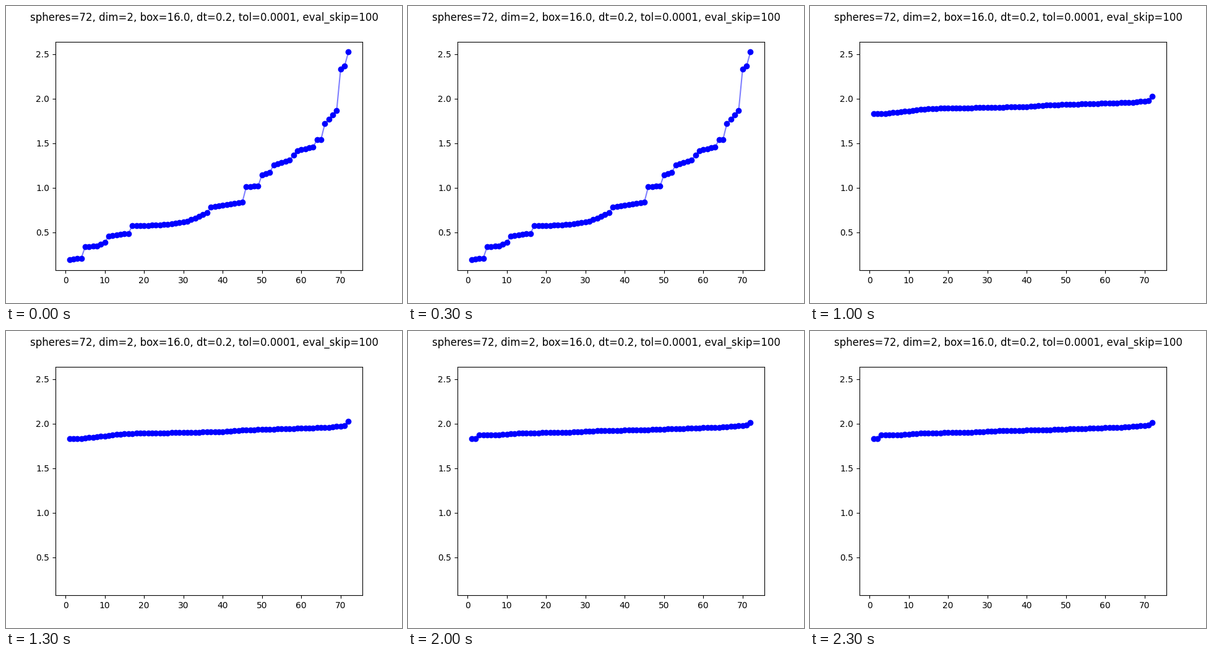
These frames come from a looping animation (640x480 px, 2.5 s). A matplotlib script:

```python
import numpy as np
import matplotlib.pyplot as plt
from matplotlib.animation import FuncAnimation

COUNT = 72
ranks = np.arange(1, COUNT + 1)


def spread(*points):
    """Straight runs between a few (rank, distance) key points."""
    return np.interp(ranks, *zip(*points))


# A loose start with jumps between runs, then nearly level curves.
stages = [
    spread((1, .19), (4, .21), (5, .337), (8, .346), (10, .39), (11, .457),
           (16, .487), (17, .574), (24, .58), (31, .622), (36, .72),
           (37, .782), (45, .84), (46, 1.011), (49, 1.018), (50, 1.146),
           (52, 1.174), (53, 1.258), (57, 1.312), (59, 1.418), (63, 1.456),
           (64, 1.539), (65, 1.54), (66, 1.719), (69, 1.868), (70, 2.328),
           (71, 2.365), (72, 2.523)),
    spread((1, 1.818), (5, 1.826), (10, 1.852), (24, 1.887), (45, 1.91),
           (63, 1.937), (70, 1.958), (72, 2.0)),
    spread((4, 1.832), (15, 1.888), (40, 1.909), (46, 1.929), (67, 1.958),
           (71, 1.978), (72, 2.027)),
    spread((2, 1.832), (7, 1.88), (22, 1.895), (38, 1.924), (48, 1.932),
           (57, 1.95), (66, 1.955), (68, 1.971), (71, 1.972), (72, 1.992)),
    spread((2, 1.832), (3, 1.874), (8, 1.876), (13, 1.894), (26, 1.902),
           (33, 1.92), (44, 1.929), (58, 1.95), (66, 1.963), (71, 1.985),
           (72, 2.013)),
]

fig, ax = plt.subplots(figsize=(6.4, 4.8), dpi=100)
fig.suptitle("spheres=72, dim=2, box=16.0, dt=0.2, tol=0.0001, eval_skip=100")
line, = ax.plot(ranks, stages[0], "b-", alpha=0.5)
dots, = ax.plot(ranks, stages[0], "bo")

# Keep the axis range of the widest spread.
ax.set_xlim(ax.get_xlim())
ax.set_ylim(ax.get_ylim())


def update(i):
    for artist in (line, dots):
        artist.set_ydata(stages[i])
    return line, dots


anim = FuncAnimation(fig, update, frames=len(stages), interval=500,
                     repeat=True, repeat_delay=0)
plt.show()
```
